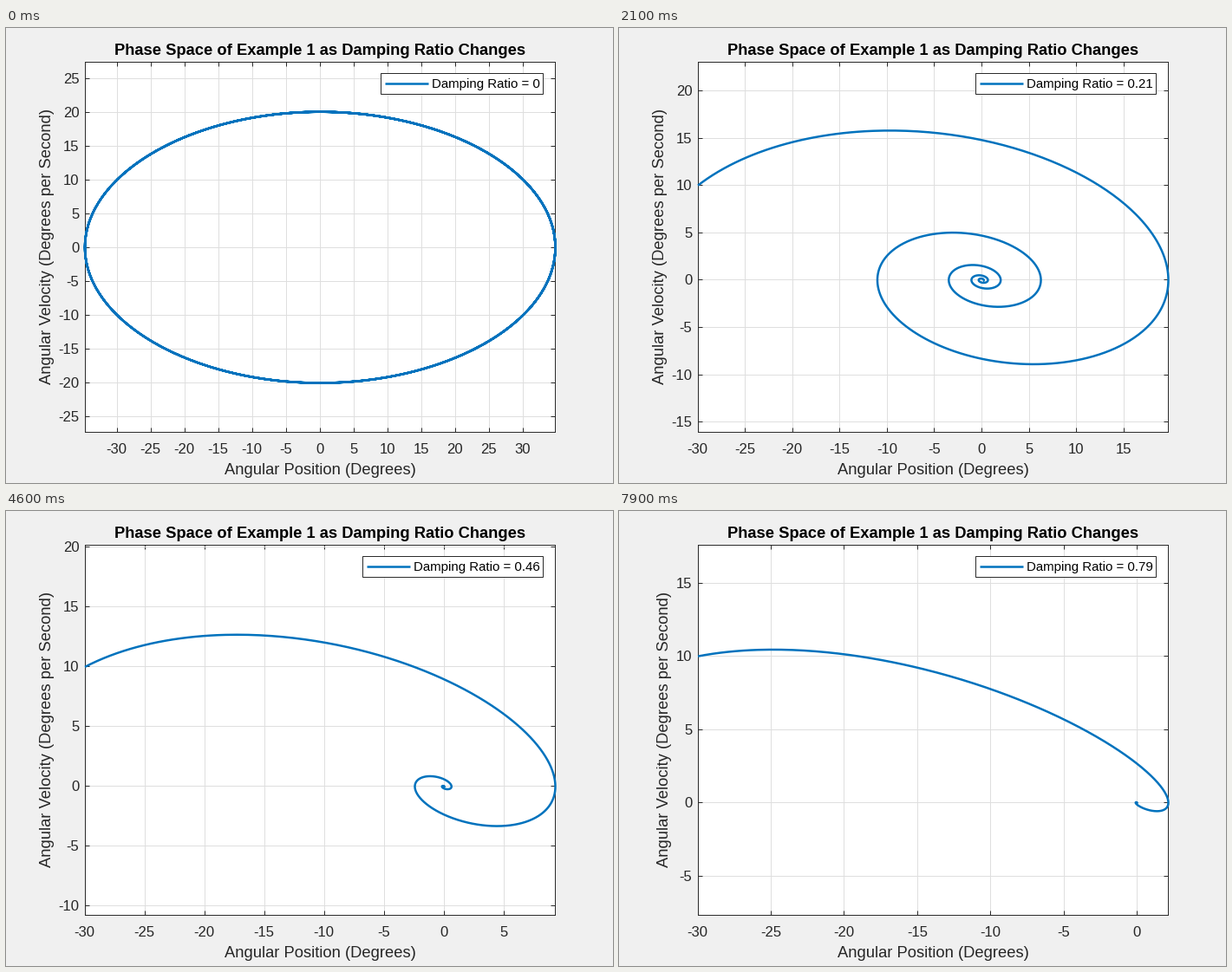
A matplotlib script for the animation above (8 s loop, 700 by 525 pixels).

```python
import numpy as np
import matplotlib.pyplot as plt
from matplotlib.animation import FuncAnimation
from matplotlib.patches import Rectangle
from matplotlib.transforms import ScaledTranslation

W, H, DPI = 700, 525, 100
FRAMES, INTERVAL = 80, 100
LEFT, RIGHT, TOP, BOTTOM = 90.5, 633, 38.9, 466.4
BLUE, DARK, GRID = "#0072BD", "#262626", "#DEDEDE"
GRAVITY, X0, V0 = 0.343, -30, 10
DURATION, STEPS = 50, 2000


def pt(px):
    return px * 72 / DPI


HAIR = pt(0.97)
TICK_FONT, LABEL_FONT, LEGEND_FONT = pt(50 / 3), pt(55 / 3), pt(15)

plt.rcParams["font.family"] = "Liberation Sans"
fig = plt.figure(figsize=(W / DPI, H / DPI), dpi=DPI, facecolor="#F0F0F0")

ax = fig.add_axes([LEFT / W, 1 - BOTTOM / H, (RIGHT - LEFT) / W, (BOTTOM - TOP) / H])
ax.set_axisbelow(True)
ax.grid(color=GRID, linewidth=HAIR)
ax.tick_params(direction="in", top=True, right=True, length=pt(5.4), width=HAIR,
               color=DARK, labelcolor=DARK, labelsize=TICK_FONT)
ax.tick_params(axis="x", pad=pt(24.85))
ax.tick_params(axis="y", pad=pt(6.2))
for spine in ax.spines.values():
    spine.set(color=DARK, linewidth=HAIR)

# Hairlines snap half a pixel right and down; the curve follows them
half_pixel = ScaledTranslation(0.5 / DPI, -0.5 / DPI, fig.dpi_scale_trans)
curve, = ax.plot([], [], color=BLUE, linewidth=pt(2.5), clip_on=False, zorder=3,
                 solid_joinstyle="round", solid_capstyle="butt",
                 transform=ax.transData + half_pixel)

# Overlay in stage pixels for the title, axis labels and legend
page = fig.add_axes([0, 0, 1, 1])
page.set(xlim=(0, W), ylim=(H, 0))
page.axis("off")


def label(x, y, text, size, color=DARK, **kw):
    return page.text(x, y, text, fontsize=size, color=color, va="baseline", **kw)


mid = (LEFT + RIGHT) / 2
label(mid + 0.5, 31, "Phase Space of Example 1 as Damping Ratio Changes",
      LABEL_FONT, "black", ha="center", weight="bold")
label(mid + 0.9, 515, "Angular Position (Degrees)", LABEL_FONT, ha="center")
y_label = label(52, 252.2, "Angular Velocity (Degrees per Second)", LABEL_FONT,
                ha="center", rotation=90, rotation_mode="anchor")

BOX_RIGHT, BOX_TOP, BOX_BOTTOM = 619.4, 52, 76
box = page.add_patch(Rectangle((432, BOX_TOP), 187, BOX_BOTTOM - BOX_TOP,
                               facecolor="white", edgecolor=DARK, linewidth=HAIR))
key, = page.plot([], [], color=BLUE, linewidth=pt(2.5), solid_capstyle="butt")
caption = label(0, 69.5, "", LEGEND_FONT, "black")


def pendulum(s, c):
    """Damped pendulum in degrees: x'' = -c x' - g sin x."""
    x, v = s
    return np.array([v, -c * v - GRAVITY * np.degrees(np.sin(np.radians(x)))])


def integrate(c):
    """Runge-Kutta for all damping ratios at once; shape (steps, 2, ratios)."""
    h = DURATION / STEPS
    s = np.array([np.full(c.shape, X0, float), np.full(c.shape, V0, float)])
    path = [s]
    for _ in range(STEPS):
        k1 = pendulum(s, c)
        k2 = pendulum(s + h / 2 * k1, c)
        k3 = pendulum(s + h / 2 * k2, c)
        k4 = pendulum(s + h * k3, c)
        s = s + h / 6 * (k1 + 2 * k2 + 2 * k3 + k4)
        path.append(s)
    return np.array(path)


ratios = np.arange(FRAMES) / 100
orbits = integrate(ratios)


def ticks(lo, hi, step=5, eps=1e-6):
    first, last = int(np.ceil(lo / step - eps)), int(np.floor(hi / step + eps))
    return [n * step for n in range(first, last + 1)]


def draw(i):
    x, v = orbits[:, 0, i], orbits[:, 1, i]
    curve.set_data(x, v)

    # Equal scales: x fits the data, y is centred on it
    x_lo, x_hi = x.min(), x.max()
    half = (x_hi - x_lo) * (BOTTOM - TOP) / (RIGHT - LEFT) / 2
    y_mid = (v.min() + v.max()) / 2
    x_ticks, y_ticks = ticks(x_lo, x_hi), ticks(y_mid - half, y_mid + half)
    ax.set_xticks(x_ticks, [str(t) for t in x_ticks])
    ax.set_yticks(y_ticks, [str(t) for t in y_ticks])
    ax.set_xlim(x_lo, x_hi)
    ax.set_ylim(y_mid - half, y_mid + half)
    plt.setp(ax.get_xticklabels(), va="baseline")

    # The axis label makes room for the widest tick label
    y_label.set_x(52 if y_ticks[0] <= -10 else 57.5)

    caption.set_text(f"Damping Ratio = {ratios[i]:g}")
    left = BOX_RIGHT - 63 - caption.get_window_extent().width * W / fig.bbox.width
    caption.set_x(left + 59)
    key.set_data([left + 5, left + 55], [64, 64])
    box.set_x(left)
    box.set_width(BOX_RIGHT - left)
    return []


anim = FuncAnimation(fig, draw, frames=FRAMES, interval=INTERVAL,
                     init_func=lambda: [], repeat=True, repeat_delay=0, blit=False)
plt.show()
```
